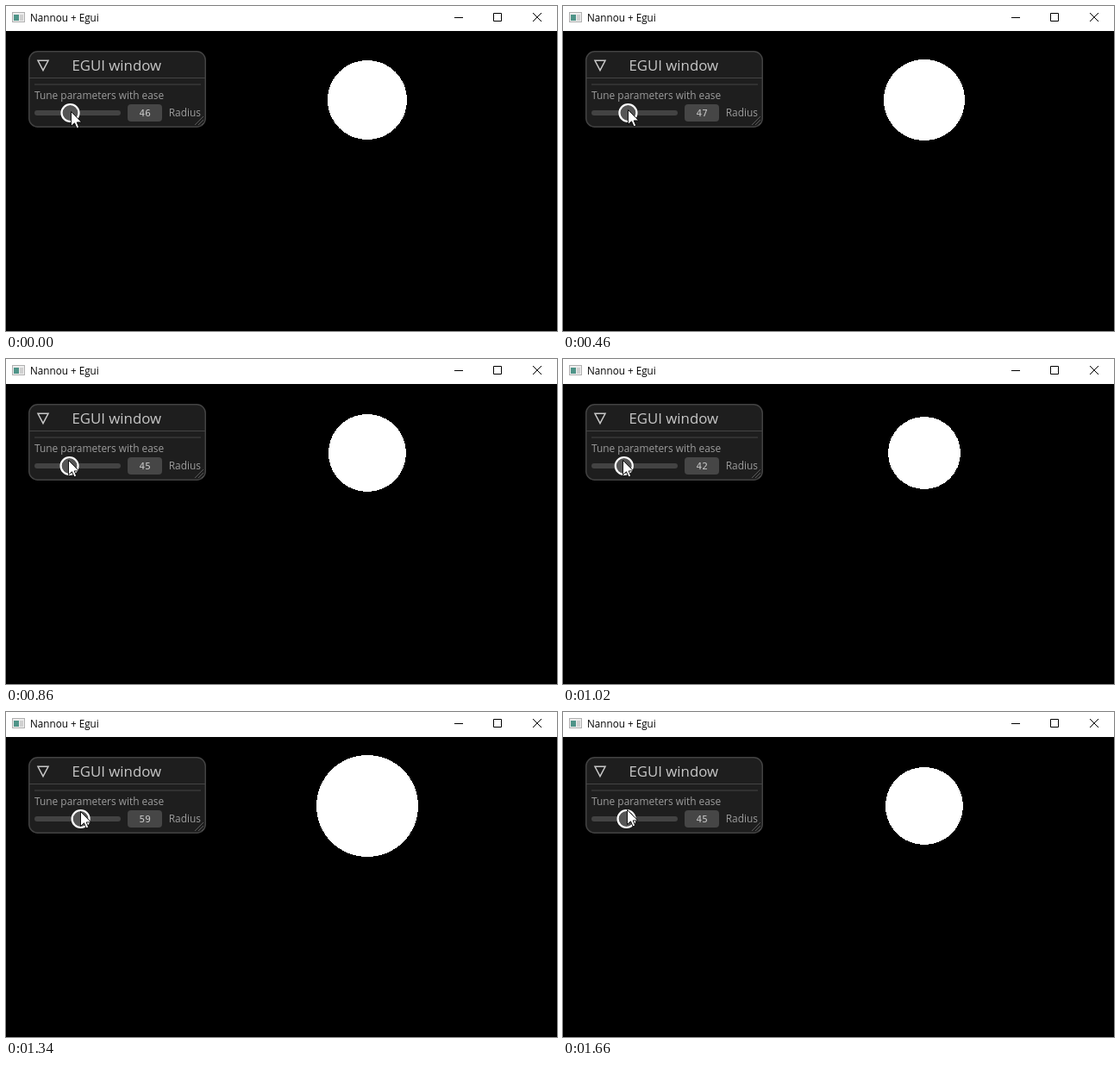
Write an HTML page that moves like this. It is 639 px wide and 377 px high and loops after 1.74 s.

```html
<!DOCTYPE html>
<html lang="en">
<head>
<meta charset="utf-8">
<title>Nannou + Egui</title>
<style>
  html, body { margin: 0; width: 100%; height: 100%; overflow: hidden; background: #000; }
  svg { display: block; width: 639px; height: 377px; }
  text { font: 11.9px "Open Sans", sans-serif; fill: #9c9c9c; }
  .caption { font-size: 11.7px; fill: #000; }
  .heading { font-size: 16.8px; fill: #c8c8c8; }
  .value { font: 11px "DejaVu Sans Mono", monospace; fill: #cacaca; text-anchor: middle; }
  .line { fill: none; stroke: #444; }
</style>
</head>
<body>
<svg viewBox="0 0 639 377">
  <rect width="639" height="377"/>
  <circle id="disc" cx="419" cy="109" fill="#fff" shape-rendering="crispEdges"/>

  <!-- title bar -->
  <rect width="639" height="29" fill="#fff"/>
  <rect x="7.5" y="7.5" width="14" height="11" fill="#eee" stroke="#b0b0b0"/>
  <rect x="9" y="10" width="6" height="7" fill="#4f9488"/>
  <rect x="16" y="10" width="4" height="7" fill="#d0d0d0"/>
  <text class="caption" x="28" y="18">Nannou + Egui</text>
  <path d="M520 13.5h10M565.5 8.5h9v9h-9zM611 8l10 10M621 8l-10 10" fill="none" stroke="#000"/>

  <!-- panel -->
  <rect x="26.75" y="52.75" width="204.5" height="87.5" rx="10" fill="#1e1e1e" stroke="#424242" stroke-width="1.5"/>
  <path class="line" d="M27 83.5h204M33 91h193"/>
  <path d="M219 138l10-10M223 138l6-6M227 138l2-2" stroke="#5a5a5a"/>
  <path d="M37 63.3h12l-6 11.4z" fill="none" stroke="#c8c8c8" stroke-width="1.5"/>
  <text class="heading" x="76.5" y="75">EGUI window</text>
  <text x="33" y="108">Tune parameters with ease</text>
  <rect x="33" y="121" width="100" height="6" rx="3" fill="#434343"/>
  <rect x="141" y="114" width="40" height="20" rx="4" fill="#464646"/>
  <text class="value" id="value" x="161.2" y="128"></text>
  <text x="188.7" y="128">Radius</text>
  <circle id="knob" cy="124" r="10" fill="#555" stroke="#fff" stroke-width="2.2"/>
  <path id="cursor" d="M0 0V17L4 13.3L6.6 19.3L9.2 18.2L6.7 12.4H12.2Z" fill="#fff" stroke="#000" stroke-width=".9"/>
</svg>
<script>
const LOOP = 1740, STEP = 80, STEPS = 22;
// the drag's turning points: step, radius
const turns = [[0, 46], [3.6, 66.5], [6.75, 44.3], [9, 61], [10, 61],
               [11.42, 41], [12, 41], [18.5, 61.3], [20, 42], [21, 45]];
const [disc, value, knob, cursor] =
  ['disc', 'value', 'knob', 'cursor'].map(id => document.getElementById(id));

const ease = u => (1 - Math.cos(Math.PI * u)) / 2;

function radiusAt(step) {
  const i = Math.max(1, turns.findIndex(([end]) => end >= step));
  const [start, from] = turns[i - 1], [end, to] = turns[i];
  return Math.round(from + (to - from) * ease((step - start) / (end - start)));
}

function draw() {
  const t = performance.now() % LOOP;
  const step = t < 70 ? 0 : Math.floor((t + 20) / STEP);
  const radius = radiusAt(step);
  const x = 74.5 + (radius - 46) * .932;
  // the hand drifts upwards and sways around the knob
  const sway = 1.2 * Math.cos(2 * Math.PI * (step - 1) / STEPS) - .3;
  const y = 122 - .41 * step;
  disc.setAttribute('r', radius);
  value.textContent = radius;
  knob.setAttribute('cx', x);
  cursor.setAttribute('transform', `translate(${Math.round(x + sway) + .5} ${Math.round(y) + .5})`);
  requestAnimationFrame(draw);
}
draw();
</script>
</body>
</html>
```
